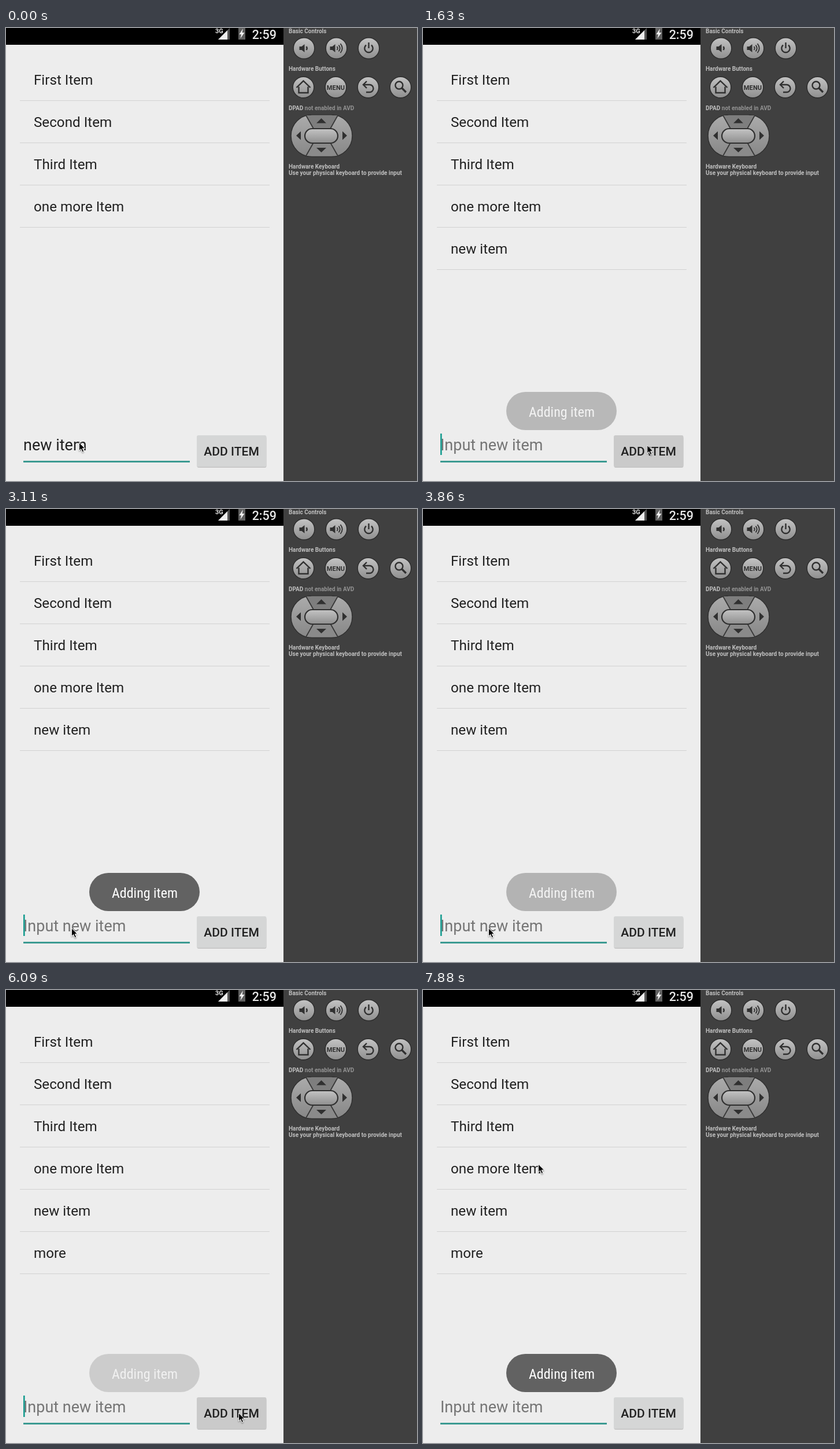
An HTML page for the animation above (8000 ms loop, 711x783 px).

```html
<!DOCTYPE html>
<html lang="en">
<head>
<meta charset="utf-8">
<title>Adding list items</title>
<style>
  html, body { margin: 0; width: 100%; height: 100%; overflow: hidden; background: #404040; }
  svg { display: block; width: 711px; height: 783px; font-family: Roboto, sans-serif; }
  .item { font-size: 24.2px; fill: #212121; }
  .field { font-size: 27px; }
  .label { font-size: 10px; font-weight: 700; fill: #bfbfbf; }
  .toast { font-size: 24px; font-stretch: 75%; font-family: "Roboto Condensed", Roboto, sans-serif; }
  .icon { fill: none; stroke: #303030; stroke-width: 2.4; }
  .solid { fill: #303030; }
</style>
</head>
<body>
<svg viewBox="0 0 711 783">
  <defs>
    <linearGradient id="metal" x2="0" y2="1">
      <stop stop-color="#c4c4c4"/><stop offset="1" stop-color="#8e8e8e"/>
    </linearGradient>
    <linearGradient id="pad" x2="0" y2="1">
      <stop stop-color="#acacac"/><stop offset="1" stop-color="#868686"/>
    </linearGradient>
    <filter id="soft" x="-50%" y="-50%" width="200%" height="200%">
      <feDropShadow dx="0" dy="1.5" stdDeviation="1.2" flood-opacity=".4"/>
    </filter>
  </defs>

  <rect width="480" height="783" fill="#ededed"/>
  <rect width="480" height="29"/>
  <text x="362" y="9" font-size="11" font-weight="700" fill="#e4e4e4">3G</text>
  <path d="M367 20L387 0V20Z" fill="#555"/>
  <path d="M367 20L383 4V20Z" fill="#eee"/>
  <path d="M402 0H414V20H402Z" fill="#606060"/>
  <path d="M410 1L403.500 11H407L405.500 18L412.500 8H408.500Z" fill="#f0f0f0"/>
  <text x="468" y="18.500" font-size="21.500" font-weight="500" text-anchor="end" fill="#e6e6e6">2:59</text>

  <g id="list"></g>

  <rect x="30" y="748" width="288" height="3" fill="#3b9a91"/>
  <text id="field" class="field" x="30" y="730"></text>
  <rect id="caret" y="701" width="2.600" height="37" fill="#159b8f"/>

  <rect x="330.500" y="706" width="120" height="54" rx="3" fill="#c4c4c4"/>
  <rect id="button" x="330" y="704" width="120.500" height="54.500" rx="3"/>
  <text x="390" y="739" font-size="21.100" font-weight="500" text-anchor="middle" fill="#212121">ADD ITEM</text>

  <g id="toast">
    <rect x="144" y="629" width="191" height="66" rx="33" fill="#626262"/>
    <text class="toast" x="240" y="672" text-anchor="middle" fill="#fff">Adding item</text>
  </g>

  <rect x="480" width="231" height="783" fill="#404040"/>
  <g class="label">
    <text x="489" y="9">Basic Controls</text>
    <text x="489" y="74">Hardware Buttons</text>
    <text x="489" y="142">DPAD <tspan fill="#929292">not enabled in AVD</tspan></text>
    <text x="489" y="243">Hardware Keyboard</text>
    <text x="489" y="254">Use your physical keyboard to provide input</text>
  </g>
  <g id="knobs"></g>

  <g transform="translate(515.500 35)">
    <path class="solid" d="M-8 -3H-4L1 -7V7L-4 3H-8Z"/>
    <path class="icon" d="M4 -3Q6.500 0 4 3"/>
  </g>
  <g transform="translate(571.500 35)">
    <path class="solid" d="M-11 -3H-7L-2 -7V7L-7 3H-11Z"/>
    <path class="icon" style="stroke-width:1.800" d="M1 -3Q3.500 0 1 3M4 -5.500Q8.500 0 4 5.500M7 -8Q13.500 0 7 8"/>
  </g>
  <path class="icon" d="M623 29.500A7.200 7.200 0 1 0 632 29.500M627.500 25V35"/>
  <path class="icon" d="M502.500 103L514.500 91.500L526.500 103M506.500 101.500V112H522.500V101.500"/>
  <text x="570.500" y="107" font-size="11" font-weight="700" text-anchor="middle" letter-spacing=".2" fill="#303030">MENU</text>
  <path class="icon" d="M624 92L618 98L624 104M618 98H629A6.500 6.500 0 0 1 629 111H623"/>
  <circle class="icon" cx="680" cy="99" r="6.500"/>
  <path class="icon" style="stroke-width:3.200" d="M685 104L692 111"/>

  <rect x="493" y="150" width="106" height="72.500" rx="36" fill="url(#pad)" stroke="#303030" stroke-width="1.500"/>
  <path d="M519 151H574L561 173H532Z" fill="#7e7e7e"/>
  <path d="M519 221H574L561 199H532Z" fill="#8a8a8a"/>
  <path d="M519 151L532 174M574 151L561 174M519 221L532 198M574 221L561 198" stroke="#383838" stroke-width="1.800"/>
  <rect x="517" y="174" width="57" height="25" rx="12.500" fill="url(#metal)" stroke="#303030" stroke-width="2.200"/>
  <path class="solid" d="M545.500 156L554 164.500H537ZM545.500 215L554 207H537ZM502 186L510 178.500V193.500ZM590 186L582 178.500V193.500Z"/>

  <path id="pointer" filter="url(#soft)" stroke="#fff" d="M0 0V14L3.200 11L5.700 16.500L8.200 15.400L5.800 10.200H10.200Z"/>
</svg>
<script>
  const LOOP = 8000, FRAME = 148.6, BLINK = 500, KEY_DELAY = 90;
  const ADDS = [1510, 6020], TYPING = 4190, WORD = "more";

  const byId = id => document.getElementById(id);
  const clamp = n => Math.min(1, Math.max(0, n));
  const svgNode = (parent, tag, attrs, text = "") => {
    const node = document.createElementNS("http://www.w3.org/2000/svg", tag);
    for (const key in attrs) node.setAttribute(key, attrs[key]);
    node.textContent = text;
    return parent.appendChild(node);
  };

  const rows = ["First Item", "Second Item", "Third Item", "one more Item", "new item", WORD].map((label, i) => {
    const row = svgNode(byId("list"), "g", { transform: `translate(0 ${73 * i})` });
    svgNode(row, "text", { class: "item", x: 48, y: 98 }, label);
    svgNode(row, "rect", { x: 24, y: 125, width: 432, height: 1, fill: "#d2d2d2" });
    return row;
  });

  const addKnobs = (count, left, y) => {
    for (let i = 0; i < count; i++) {
      svgNode(byId("knobs"), "circle", {
        cx: left + 56 * i, cy: y, r: 18.3, fill: "url(#metal)", stroke: "#2c2c2c", "stroke-width": 1.4
      });
    }
  };
  addKnobs(3, 515.5, 35);
  addKnobs(4, 514.5, 102.5);

  // The pointer decelerates into each stop and rests there until the next move.
  const home = { x: 126.5, y: 716.5 };
  const moves = [
    { from: 0, to: 590, x: 203, y: 624 },
    { from: 590, to: 1180, x: 389, y: 730 },
    { from: 1630, to: 1930, x: 363, y: 537 },
    { from: 1930, to: 2370, x: 132, y: 761 },
    { from: 2370, to: 2670, x: 113.5, y: 724.5 },
    { from: 5200, to: 5800, x: 402.5, y: 731 },
    { from: 6100, to: 6690, x: 272, y: 538 },
    { from: 6690, to: 7880, x: 199.5, y: 301 }
  ];
  const pointerAt = time => moves.reduce(({ x, y }, move) => {
    const eased = 1 - (1 - clamp((time - move.from) / (move.to - move.from))) ** 3;
    return { x: x + (move.x - x) * eased, y: y + (move.y - y) * eased };
  }, home);

  // The caret restarts its blink at every edit.
  function inputAt(time) {
    if (time < ADDS[0]) return { text: "new item", edited: -610 };
    if (time >= ADDS[1]) return { text: "", edited: ADDS[1] };
    const keys = Math.min(WORD.length, Math.floor((time - TYPING) / KEY_DELAY));
    if (keys < 1) return { text: "", edited: ADDS[0] };
    return { text: WORD.slice(0, keys), edited: TYPING + keys * KEY_DELAY };
  }

  const toastOpacity = age => (1 - (1 - clamp(age / 600)) ** 2) * (1 - clamp((age - 2000) / 460) ** 2);

  const field = byId("field");

  function draw(time) {
    const { text, edited } = inputAt(time);
    const label = text || "Input new item";
    if (field.textContent !== label) field.textContent = label;
    field.setAttribute("fill", text ? "#212121" : "#757575");
    byId("caret").setAttribute("x", text ? 29.5 + field.getComputedTextLength() : 30);
    byId("caret").setAttribute("opacity", Math.floor((time - edited) / BLINK) % 2 ? 0 : 1);

    const pressed = ADDS.some(add => time > add - 80 && time < add + 200);
    byId("button").setAttribute("fill", pressed ? "#cacaca" : "#d5d6d6");
    byId("toast").setAttribute("opacity", Math.max(...ADDS.map(add => toastOpacity(time - add))));

    const { x, y } = pointerAt(time);
    byId("pointer").setAttribute("transform", `translate(${x} ${y})`);
    const visible = 4 + ADDS.filter(add => time >= add).length;
    rows.forEach((row, i) => row.setAttribute("visibility", i < visible ? "visible" : "hidden"));
  }

  const began = performance.now();
  function tick() {
    const time = (performance.now() - began) % LOOP;
    draw(Math.floor((time + 9) / FRAME) * FRAME);
    requestAnimationFrame(tick);
  }
  tick();
</script>
</body>
</html>
```
